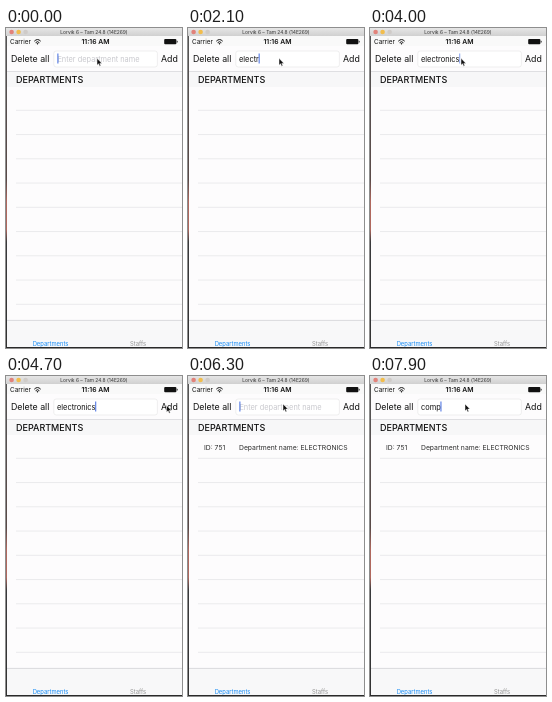
These frames come from a looping animation (176 by 320 pixels, 8000 ms). An HTML page:

```html
<!DOCTYPE html>
<html lang="en">
<head>
<meta charset="utf-8">
<title>Departments</title>
<style>
  html, body { margin: 0; width: 100%; height: 100%; overflow: hidden; background: #fff; }
  svg { display: block; width: 176px; height: 320px; }
  text { font-family: Inter, "Liberation Sans", sans-serif; fill: #111; white-space: pre; }
  .button { font-size: 8.8px; }
  .entry { font-size: 7.4px; }
  .hint { font-size: 7.4px; fill: #c9c9ce; }
  .row { font-size: 6.8px; fill: #2c2c2c; }
  .tab { font-size: 5.85px; text-anchor: middle; }
</style>
</head>
<body>
<svg viewBox="0 0 176 320" xmlns="http://www.w3.org/2000/svg">
  <defs>
    <linearGradient id="bar" x2="0" y2="1">
      <stop stop-color="#e6e6e6"/><stop offset="1" stop-color="#d0d0d0"/>
    </linearGradient>
    <linearGradient id="edge" x2="0" y2="1">
      <stop stop-color="#555"/><stop offset=".46" stop-color="#5a4a48"/>
      <stop offset=".53" stop-color="#b0685e"/><stop offset=".62" stop-color="#b0685e"/>
      <stop offset=".66" stop-color="#3a3a3c"/><stop offset="1" stop-color="#333"/>
    </linearGradient>
  </defs>

  <rect width="176" height="320" fill="#fdfcfd"/>
  <rect y="8" width="176" height="10" fill="#f9f9f9"/>
  <rect width="176" height="8" fill="url(#bar)"/>
  <circle cx="5.6" cy="4" r="2.3" fill="#e2827a"/>
  <circle cx="12.6" cy="4" r="2.3" fill="#f2bd4c"/>
  <circle cx="19.6" cy="4" r="2.3" fill="#cfcbc8"/>
  <text x="88" y="5.9" font-size="4.9" text-anchor="middle" style="fill:#333">Lorvik 6 – Tam 24.8 (14E269)</text>

  <text x="4" y="16.2" font-size="6.4">Carrier</text>
  <path d="M28.3 13.2Q31.5 9.9 34.7 13.2M29.6 14.7Q31.5 12.7 33.4 14.7" fill="none" stroke="#111"/>
  <path d="M30.5 15.6Q31.5 14.6 32.5 15.6L31.5 16.8Z" fill="#111"/>
  <text x="89.5" y="16.3" font-size="6.8" font-weight="600" text-anchor="middle">11:16 AM</text>
  <rect x="158.2" y="11" width="12.2" height="5.2" rx="1" fill="#111"/>
  <rect x="170.8" y="12.7" width=".8" height="1.9" rx=".4" fill="#111"/>

  <text class="button" x="5" y="34.2">Delete all</text>
  <rect x="47.8" y="23" width="103.6" height="16" rx="2.4" fill="#fff" stroke="#e4e4e4" stroke-width=".6"/>
  <text class="button" id="add" x="155" y="34.2">Add</text>

  <rect y="43" width="176" height="15.8" fill="#f7f7f8"/>
  <path d="M0 43.5H176" stroke="#d6d6d8" stroke-width=".7"/>
  <text x="10" y="54.6" font-size="9" font-weight="500">DEPARTMENTS</text>
  <path id="lines" stroke="#e2e2e5" stroke-width=".7"/>

  <g id="row">
    <text class="row" x="16" y="73.7">ID: 751</text>
    <text class="row" x="51" y="73.7">Department name: ELECTRONICS</text>
  </g>

  <rect y="292" width="176" height="28" fill="#f8f8f9"/>
  <path d="M0 292.4H176" stroke="#c6c6c9" stroke-width=".6"/>
  <text class="tab" x="44.5" y="318" style="fill:#168bf5">Departments</text>
  <text class="tab" x="132" y="318" style="fill:#929292">Staffs</text>
  <rect y="8" width="1" height="312" fill="url(#edge)"/>
  <rect y="319" width="176" height="1" fill="#2a2a2a"/>

  <text class="hint" id="hint" x="51.4" y="33.9">Enter department name</text>
  <text class="entry" id="entry" x="51" y="33.9"></text>
  <rect id="caret" y="25.5" width="1" height="10" fill="#426be0"/>

  <g id="bubble">
    <rect id="bubbleBox" x="49.4" y="37" height="12.4" rx="1.5" fill="#fff" stroke="#cfcfd2" stroke-width=".6"/>
    <text class="entry" id="guess" x="51" y="45.8" style="fill:#2e7cf0"></text>
    <path id="cross" d="M-1.2 42L1.2 44.4M1.2 42L-1.2 44.4" stroke="#999" stroke-width=".7"/>
  </g>

  <g id="menu">
    <path d="M36 43.8H47L51.8 38.6L56.6 43.8H67Q71 43.8 71 47.8V60Q71 64 67 64H36Q32 64 32 60V47.8Q32 43.8 36 43.8Z" fill="#2a2a2a"/>
    <text x="51.5" y="56.8" font-size="7.2" text-anchor="middle" style="fill:#fff">Paste</text>
  </g>

  <path id="mouse" d="M0 0V7L1.6 5.5L2.6 7.9L3.8 7.4L2.8 5.1H5Z" fill="#111" stroke="#fff" stroke-width=".5"/>
</svg>
<script>
const LOOP = 8000, STEP = 100;
const $ = id => document.getElementById(id);
const clamp = v => Math.max(0, Math.min(1, v));
const ramp = (t, a, b) => clamp((t - a) / (b - a));
const smooth = p => p * p * (3 - 2 * p);
const mix = (a, b, p) => a + (b - a) * p;
const show = (id, v) => $(id).setAttribute("opacity", v);

let lines = "";
for (let i = 0; i < 9; i++) lines += `M10 ${(82.3 + i * 24.25).toFixed(2)}H176`;
$("lines").setAttribute("d", lines);

// [time, number of letters in the field]
const typing = [
  ["electronics", [[1100, 1], [1300, 3], [1500, 4], [1900, 5], [2100, 6], [2300, 7],
    [2500, 8], [2800, 9], [3000, 10], [3300, 11], [5100, 0]]],
  ["computer", [[7200, 1], [7400, 2], [7600, 3], [7900, 4]]]
];
// [fade out starts, fade in starts]
const blinks = [[200, 700], [3900, 4400], [5700, 6100], [6700, 7100]];

function typed(t) {
  let s = "";
  for (const [word, keys] of typing)
    for (const [at, n] of keys) if (t >= at) s = word.slice(0, n);
  return s;
}

function caretAlpha(t) {
  for (const [out, back] of blinks)
    if (t >= out && t < back + 300) return clamp(1 - ramp(t, out, out + 300) + ramp(t, back, back + 200));
  return 1;
}

function drawBubble(t) {
  const early = t >= 1500 && t < 1600;
  const alpha = early ? 1 : t >= 3000 ? 1 - ramp(t, 3200, 3600) : 0;
  show("bubble", alpha);
  if (!alpha) return;
  $("guess").textContent = early ? "elect" : "electronics";
  const w = $("guess").getComputedTextLength();
  $("bubbleBox").setAttribute("width", w + 8);
  $("cross").setAttribute("transform", `translate(${51 + w + 3.6} 0)`);
}

function mouseAt(t) {
  if (t < 5300) {
    const p = smooth(ramp(t, 4000, 4700));
    return [mix(91, 160.5, p), mix(30.3, 29.3, p)];
  }
  const p = 1 - (1 - ramp(t, 5300, 6000)) ** 2;
  return [mix(160.5, 95, p), mix(29.3, 28, p)];
}

function draw(t) {
  const s = typed(t);
  $("entry").textContent = s;
  show("hint", s ? 0 : 1);
  $("caret").setAttribute("x", s ? 50.8 + $("entry").getComputedTextLength() : 51.4);
  show("caret", caretAlpha(t));
  drawBubble(t);
  show("menu", Math.min(ramp(t, 6700, 7000), 1 - ramp(t, 7200, 7500)));
  show("row", ramp(t, 5000, 5400));
  show("add", t >= 5000 ? mix(.3, 1, ramp(t, 5100, 5400)) : 1);
  $("mouse").setAttribute("transform", `translate(${mouseAt(t)})`);
}

function tick(now) {
  draw(Math.floor(now % LOOP / STEP) * STEP);
  requestAnimationFrame(tick);
}
draw(0);
requestAnimationFrame(tick);
</script>
</body>
</html>
```
